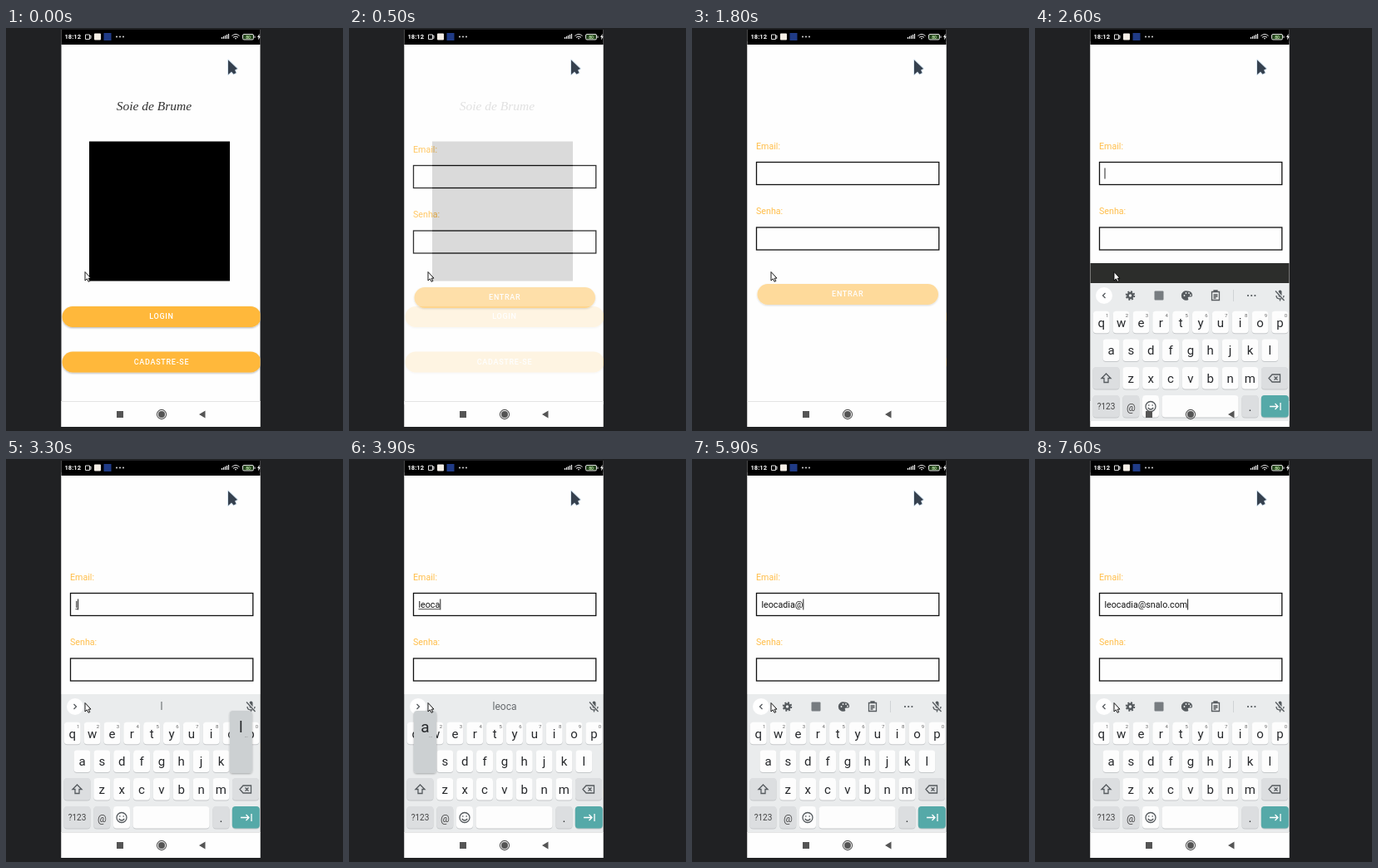
An HTML page that plays this animation: 405 px wide and 485 px high, repeating every 8000 ms.

```html
<!DOCTYPE html>
<html lang="pt">
<head>
<meta charset="utf-8">
<style>
  html, body { margin: 0; width: 100%; height: 100%; overflow: hidden; background: #202123; }
  svg { display: block; width: 405px; height: 485px; font-family: Roboto, sans-serif; }
  .title { font: italic 15.5px "Liberation Serif", serif; fill: #333; }
  .btn { font-size: 9px; font-weight: 500; letter-spacing: .7px; fill: #fff; }
  .label { font-size: 10.7px; fill: #ffbf4d; }
  .typed { font-size: 10.7px; fill: #111; }
  .key { font-size: 15px; fill: #26282b; }
  .hint { font-size: 6px; fill: #666; }
  .small { font-size: 10px; fill: #444; }
  .word { font-size: 12px; fill: #65696d; }
  .line { fill: none; stroke: #555a5e; stroke-width: 1.3; }
  .ink { fill: #555a5e; }
</style>
</head>
<body>
<svg viewBox="0 0 405 485">
  <defs>
    <clipPath id="screen"><path d="M66.5 2H305.5V480H66.5Z"/></clipPath>
    <filter id="shadow" x="-10%" y="-30%" width="120%" height="180%">
      <feDropShadow dx="0" dy="1" stdDeviation=".8" flood-opacity=".3"/>
    </filter>
  </defs>
  <g clip-path="url(#screen)">
    <path fill="#fefefe" d="M66 2H306V480H66Z"/>
    <g id="home"></g>
    <g id="form"></g>
    <path fill="#fefefe" d="M66 449H306V480H66Z"/>
    <path stroke="#e4e4e4" d="M66 449.5H306"/>
    <path id="dark" fill="#2c2d2b" d="M66 283H306V449H66Z"/>
    <g id="board"></g>
    <g id="nav" fill="#555">
      <path d="M133 461h8v8h-8ZM232 465l7.5-4.5v9Z"/>
      <circle cx="187" cy="465" r="4"/>
      <circle cx="187" cy="465" r="5.6" fill="none" stroke="#555" stroke-width="1.1"/>
    </g>
    <g id="status">
      <path d="M66 2H306V20H66Z"/>
      <path d="M95.5 8h5v5.500h-5zM100.500 10l1.500-1v3.500l-1.500-1" fill="none" stroke="#ddd"/>
      <rect x="106" y="6.500" width="8" height="8" rx="1" fill="#f4eee6"/>
      <rect x="117.500" y="6" width="9" height="9" fill="#203b86"/>
      <path d="M133 10.500h9" stroke="#eee" stroke-width="1.800" stroke-linecap="round" stroke-dasharray="0 4"/>
      <path d="M259.500 13v-2M261.500 13v-3M263.500 13v-4M265.500 13v-5M267.500 13v-6" stroke="#eee" stroke-width="1.200"/>
      <path d="M271.500 9.500q4.500-4 9 0M273 11.300q3-2.500 6 0M275 13q1-1 2 0" fill="none" stroke="#eee"/>
      <rect x="284.500" y="7.500" width="13" height="6.500" rx="1.500" fill="#27451f" stroke="#ddd"/>
      <path d="M299 9.500v2.500" stroke="#ddd"/>
      <path d="M304.500 7l-2.500 4h1.500l-.5 3.500l3-4.500h-1.500Z" fill="#eee"/>
    </g>
  </g>
  <path d="M267 38.500V56l4-3.500 2.500 3 3-1.500-1.500-3.500 3-1.500Z" fill="#36414f" stroke="#d4e3ef" stroke-width="1.800" paint-order="stroke" stroke-linejoin="round"/>
  <path d="M95 293.500v10.500l2.400-2.200 1.700 3.500 1.700-.8-1.600-3.400h2.800Z" fill="#fff" stroke="#000" stroke-width=".9"/>
</svg>
<script>
const $ = id => document.getElementById(id);

function add(parent, tag, attrs, text) {
  const el = document.createElementNS('http://www.w3.org/2000/svg', tag);
  for (const name in attrs) el.setAttribute(name, attrs[name]);
  if (text) el.textContent = text;
  return parent.appendChild(el);
}
const box = (parent, x, y, width, height, fill, more) =>
  add(parent, 'rect', { x, y, width, height, fill, ...more });
const path = (parent, d, more) => add(parent, 'path', { d, class: 'line', ...more });
const label = (parent, x, y, text, cls, anchor = 'middle') =>
  add(parent, 'text', { x, y, dy: '.35em', class: cls, 'text-anchor': anchor }, text);
const show = (el, on) => el.setAttribute('visibility', on ? 'visible' : 'hidden');

function button(parent, x, y, width, text, opacity = 1) {
  const g = add(parent, 'g', { opacity });
  box(g, x, y, width, 25, '#ffb83a', { rx: 12.5, filter: 'url(#shadow)' });
  label(g, x + width / 2, y + 12.2, text, 'btn');
}

// Start page
const home = $('home'), form = $('form'), board = $('board');
label(home, 178, 94, 'Soie de Brume', 'title');
box(home, 100, 136.5, 169, 168, '#000');
button(home, 67.5, 335, 239, 'LOGIN');
button(home, 67.5, 389.5, 239, 'CADASTRE-SE');

// Login form
box(form, 66, 16, 240, 433, '#fefefe');
[['Email:', 142], ['Senha:', 220.5]].forEach(([text, y]) => {
  label(form, 77, y, text, 'label', 'start');
  box(form, 77.5, y + 19.5, 219.3, 27, 'none', { stroke: '#111', 'stroke-width': 1.3 });
});
button(form, 78.5, 308, 217.5, 'ENTRAR', .5);
const typed = label(form, 83.5, 175, '', 'typed', 'start');
const underline = box(form, 83.5, 180.3, 0, .9, '#333');
const caret = box(form, 0, 168.5, 1, 13, '#222');

// Keyboard
const keys = {};
function key(x, y, width, fill = '#fdfdfd') {
  box(board, x - width / 2, y - 13, width, 27, '#c5c8ca', { rx: 4 });
  box(board, x - width / 2, y - 13.5, width, 26.5, fill, { rx: 4 });
}
function row(letters, x0, y) {
  [...letters].forEach((c, i) => {
    const x = x0 + i * 23.85;
    keys[c] = [x, y];
    key(x, y, 20);
    label(board, x, y, c, 'key');
    if (y < 340) label(board, x + 7, y - 8.5, String((i + 1) % 10), 'hint');
  });
}
box(board, 66, 283, 240, 166, '#eaeced');
row('qwertyuiop', 79.7, 330.3);
row('asdfghjkl', 91.5, 364);
row('zxcvbnm', 115.3, 397.5);
key(85.500, 397.5, 32, '#dcdee0');
key(288, 397.5, 32, '#dcdee0');
key(85.500, 431.5, 32, '#dcdee0');
key(115.3, 431.5, 20, '#dcdee0');
key(139, 431.5, 20);
key(198.5, 431.5, 92);
key(258.5, 431.5, 20, '#dcdee0');
key(288.3, 431.5, 33, '#55a9a8');
label(board, 85.5, 431.5, '?123', 'small');
label(board, 115.3, 432.5, '@', 'small').style.fontSize = '12px';
label(board, 258.5, 431.5, '.', 'key');
path(board, 'M85.5 392l5.5 5.5h-3v5h-5v-5h-3Z');
path(board, 'M281 397.5l4-4.500h9.500v9h-9.500ZM287.500 395.500l4 4m0-4l-4 4');
path(board, 'M282 431.500h10m-3.500-3.500l3.500 3.500l-3.500 3.500M295 427v9', { stroke: '#fff', style: 'stroke:#fff' });
path(board, 'M133 431.5a6 6 0 1 0 12 0a6 6 0 1 0-12 0M135.700 433q3.300 4 6.600 0M136.800 429.200v1.500M141.200 429.200v1.500');

// Toolbar above the keys
add(board, 'circle', { cx: 83, cy: 298, r: 10, fill: '#fff' });
const chevron = path(board, '');
const tools = add(board, 'g', {});
add(tools, 'circle', { cx: 114.5, cy: 298, r: 3, class: 'line', style: 'stroke-width:2.6' });
add(tools, 'circle', { cx: 114.5, cy: 298, r: 4.8, class: 'line', style: 'stroke-width:1.9;stroke-dasharray:2 1.770' });
box(tools, 143.500, 292.500, 11, 11, '#777c80', { rx: 1 });
path(tools, 'M183 292.500a5.700 5.700 0 1 0 0 11q2 0 1-2t1.500-2h2q2 0 1.500-3q-1-4-6-4Z', { class: 'ink' });
[[179.5, 298], [181.5, 295], [185, 295], [187, 297.5]].forEach(([cx, cy]) =>
  add(tools, 'circle', { cx, cy, r: .9, fill: '#eaeced' }));
path(tools, 'M212.500 293.500h9v10h-9ZM215 293.500v-1.500h4v1.500M214.500 297h5M214.500 299h5M214.500 301h3');
path(tools, 'M238.500 291v14', { style: 'stroke:#d0d3d5;stroke-width:1' });
path(tools, 'M256 298h9', { style: 'stroke-width:2.2;stroke-linecap:round;stroke-dasharray:0 4.200' });
path(board, 'M294.500 293.500v4.500', { style: 'stroke-width:4;stroke-linecap:round' });
path(board, 'M290 298q0 4 4.500 4t4.500-4M294.500 302v2.500');
path(board, 'M289.500 292l10 11.500', { style: 'stroke:#eaeced;stroke-width:2.600' });
path(board, 'M289 292.500l10.500 11.500');
const word = label(board, 187, 298, '', 'word');

const popup = add(board, 'g', {});
box(popup, -13.5, -61, 27, 75, '#ccd0d2', { rx: 4, filter: 'url(#shadow)' });
const popKey = label(popup, 0, -42, '', 'key');
popKey.style.fontSize = '19px';
label(popup, 6.5, -31, '…', 'hint');

// Time, typed text, pressed key
const typing = [
  [0, ''], [3300, 'l', 'l'], [3400, 'le', 'e'], [3600, 'leoc', 'c'],
  [3900, 'leoca', 'a'], [4100, 'leoca'], [4300, 'leocad', 'd'], [4500, 'leocad'],
  [4700, 'leocadi', 'i'], [4900, 'leocadia', 'a'], [5100, 'leocadia'], [5700, 'leocadia@'],
  [6100, 'leocadia@s', 's'], [6200, 'leocadia@sn', 'n'], [6500, 'leocadia@sn'],
  [6800, 'leocadia@sna', 'a'], [7000, 'leocadia@snal'], [7200, 'leocadia@snalo'],
  [7400, 'leocadia@snalo.c'], [7600, 'leocadia@snalo.com']
];
const entering = [[0, 0, 0], [500, .86, 4], [700, .98, 1], [900, 1, 0]];
const sliding = [[0, 166], [2500, 90], [2600, 24], [2700, 7], [2800, 0]];
const at = (steps, t) => steps.findLast(s => s[0] <= t);

function draw(t) {
  const [, opacity, drop] = at(entering, t);
  form.setAttribute('opacity', opacity);
  form.setAttribute('transform', `translate(0 ${drop})`);

  const open = t >= 2500;
  show($('dark'), open);
  board.setAttribute('display', open ? 'inline' : 'none');
  board.setAttribute('transform', `translate(0 ${at(sliding, t)[1]})`);

  const [, text, pressed] = at(typing, t);
  const composing = t >= 3300 && t < 5700;
  typed.textContent = text;
  const width = text ? typed.getComputedTextLength() : 0;
  underline.setAttribute('width', composing ? width : 0);
  caret.setAttribute('x', 83.5 + width);
  show(caret, (t >= 1500 && t < 1800) || (t >= 2400 && t < 3000) || t >= 3300);

  word.textContent = composing ? text : '';
  show(tools, !composing);
  chevron.setAttribute('d', composing ? 'M81.500 295l3 3l-3 3' : 'M84.500 295l-3 3l3 3');
  popup.setAttribute('display', pressed ? 'inline' : 'none');
  if (pressed) {
    popup.setAttribute('transform', `translate(${keys[pressed]})`);
    popKey.textContent = pressed;
  }
}

label($('status'), 70.5, 10.8, '18:12', '', 'start').setAttribute('style', 'font-size:7.6px;font-weight:700;fill:#fff');
label($('status'), 291, 10.8, '80', '').setAttribute('style', 'font-size:5px;font-weight:700;fill:#b9e5a5');

const start = performance.now();
function frame() {
  draw((performance.now() - start) % 8000);
  requestAnimationFrame(frame);
}
frame();
</script>
</body>
</html>
```
